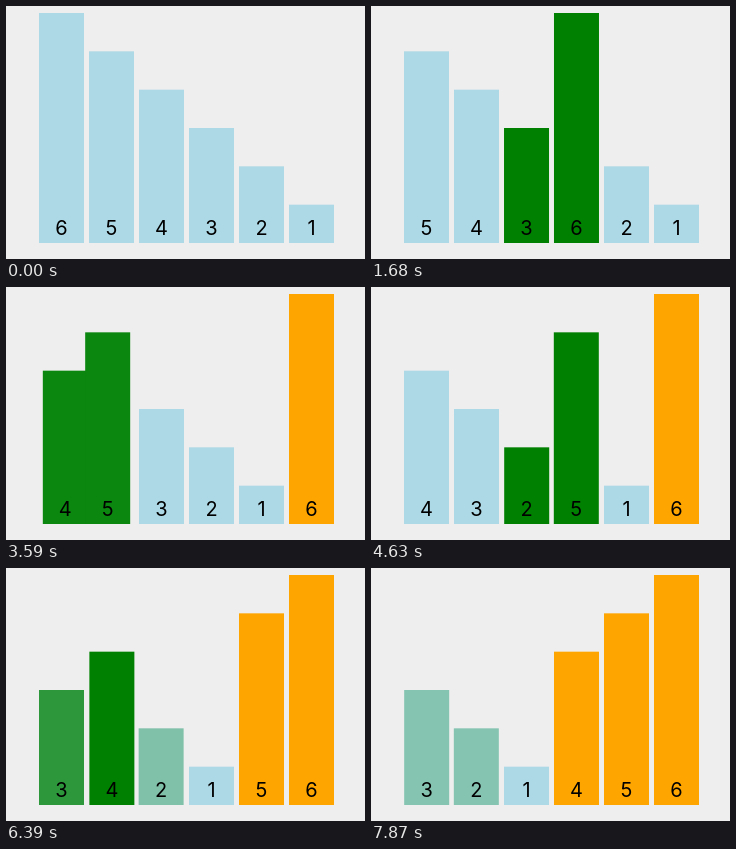
An HTML page that plays this animation: 359x253 px, repeating every 8 s.

```html
<!DOCTYPE html>
<html lang="en">
<head>
<meta charset="utf-8">
<title>Bubble sort</title>
<style>
  html, body { margin: 0; width: 100%; height: 100%; overflow: hidden; background: #eee; }
  svg { display: block; width: 100%; height: 100%; }
  text { font: 20px Inter, "Liberation Sans", sans-serif; text-anchor: middle; }
</style>
</head>
<body>
<svg id="stage" viewBox="0 0 359 253"></svg>
<script>
const COUNT = 6, LEFT = 33, PITCH = 50, WIDTH = 45, BASE = 237, UNIT = 230 / COUNT;
const LOOP = 8000;
const TICK = 147.4, FIRST_TICK = 495;       // the picture refreshes once per tick
const STEP = 493.7, LEAD = 91;              // one sorting step, and its start before the first tick
const FADE = 240, MOVE = 265, MOVE_DELAY = 30;
const IDLE = [173, 216, 230], ACTIVE = [0, 128, 0], DONE = [255, 165, 0];

const stage = document.getElementById('stage');

function add(parent, tag, attrs) {
  const el = document.createElementNS(stage.namespaceURI, tag);
  for (const name in attrs) el.setAttribute(name, attrs[name]);
  return parent.appendChild(el);
}

// Larger values are painted last, so the bar moving right stays on top.
const bars = Array.from({ length: COUNT }, (_, i) => {
  const value = i + 1, height = value * UNIT;
  const group = add(stage, 'g', {});
  const rect = add(group, 'rect', { y: BASE - height, width: WIDTH, height });
  add(group, 'text', { x: WIDTH / 2, y: 229 }).textContent = value;
  return { value, group, rect };
});

// Every state lists slot and colour for each value.
function sortStates() {
  const order = Array.from({ length: COUNT }, (_, i) => COUNT - i);
  const states = [];
  const save = (pair, sorted) => states.push(bars.map(({ value }) => {
    const slot = order.indexOf(value);
    const color = slot >= sorted ? DONE : pair.includes(slot) ? ACTIVE : IDLE;
    return { slot, color };
  }));
  save([], COUNT);
  for (let end = COUNT - 1; end > 0; end--) {
    for (let j = 0; j < end; j++) {
      if (order[j] > order[j + 1]) [order[j], order[j + 1]] = [order[j + 1], order[j]];
      save([j, j + 1], end + 1);
    }
    save([], end);
  }
  return states;
}

const states = sortStates();
const clamp = x => Math.min(1, Math.max(0, x));
const mix = (a, b, p) => a + (b - a) * p;
const easeInOut = x => x < 0.5 ? 4 * x ** 3 : 1 - 4 * (1 - x) ** 3;

function render(time) {
  const clock = Math.floor((time - FIRST_TICK) / TICK) * TICK + LEAD;
  const index = Math.max(0, Math.floor(clock / STEP));
  const elapsed = clock - index * STEP;
  const fade = clamp(elapsed / FADE);
  const move = easeInOut(clamp((elapsed - MOVE_DELAY) / MOVE));
  bars.forEach(({ group, rect }, i) => {
    const from = states[index][i], to = states[index + 1][i];
    const x = LEFT + PITCH * mix(from.slot, to.slot, move);
    const color = from.color.map((c, n) => Math.round(mix(c, to.color[n], fade)));
    group.setAttribute('transform', `translate(${x} 0)`);
    rect.setAttribute('fill', `rgb(${color})`);
  });
}

const start = performance.now();
function frame() {
  render((performance.now() - start) % LOOP);
  requestAnimationFrame(frame);
}
frame();
</script>
</body>
</html>
```
